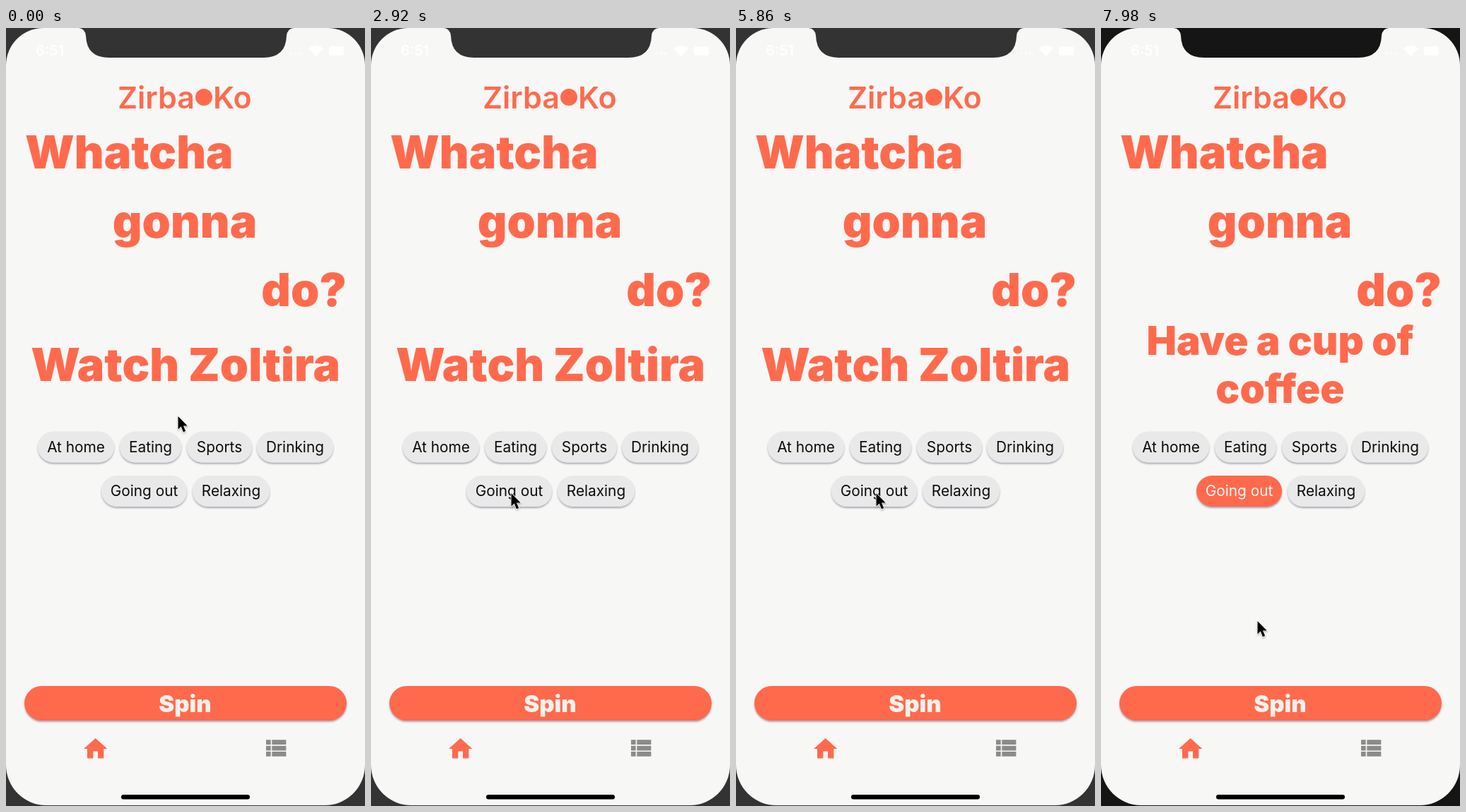
An HTML page that plays this animation: 508 px wide and 1102 px high, repeating every 8000 ms.

```html
<!DOCTYPE html>
<html lang="en">
<head>
<meta charset="utf-8">
<title>Activity picker</title>
<style>
html, body { margin: 0; width: 100%; height: 100%; overflow: hidden; background: #333; }
svg { display: block; width: 508px; height: 1102px; font-family: Inter, "Open Sans", sans-serif; }
.big { font-size: 64.5px; font-weight: 900; fill: #ff6a4d; }
.two { font-size: 56.5px; }
.spin { font-size: 33px; font-weight: 900; fill: #f6f1ec; }
.name { font-size: 43px; font-weight: 600; fill: #ff6a4d; }
.chip { font-size: 20.8px; fill: #0b0b0b; }
.mid { text-anchor: middle; }
</style>
</head>
<body>
<svg viewBox="0 0 508 1102">
  <defs>
    <filter id="shade" x="-10%" y="-20%" width="120%" height="150%">
      <feDropShadow dx="0" dy="2" stdDeviation="1.3" flood-color="#3a3a60" flood-opacity=".42"/>
    </filter>
    <filter id="soft" x="-50%" y="-50%" width="200%" height="200%">
      <feDropShadow dx="0" dy="1.5" stdDeviation="1.2" flood-color="#000" flood-opacity=".3"/>
    </filter>
  </defs>

  <rect class="frame" width="508" height="1102"/>
  <path fill="#f7f7f6" d="M0 53A53 53 0 0 1 53 0H455A53 53 0 0 1 508 53V1044A57 57 0 0 1 451 1101H57A57 57 0 0 1 0 1044Z"/>
  <path class="frame" d="M103 0Q112 1 113 11Q114 42 146 42H364Q396 42 397 11Q398 1 407 0Z"/>

  <g fill="#fff">
    <text x="42" y="39" font-size="20" font-weight="600">6:51</text>
    <circle cx="404" cy="36" r="1.5"/><circle cx="410" cy="36" r="1.5"/><circle cx="416" cy="36" r="1.5"/>
    <path d="M428 29Q438.500 20 449 29L438.500 40Z"/>
    <rect x="457" y="26" width="21" height="13" rx="3"/>
  </g>

  <text class="name" x="158" y="114">Zirba</text>
  <circle cx="280" cy="98" r="12" fill="#ff6a4d"/>
  <text class="name" x="293" y="114">Ko</text>

  <text class="big" x="27" y="199">Whatcha</text>
  <text class="big mid" x="253" y="297">gonna</text>
  <text class="big" x="482" y="394" text-anchor="end">do?</text>
  <text id="before" class="big mid" x="254" y="500">Watch Zoltira</text>
  <g id="after" class="big two mid">
    <text x="253.500" y="463">Have a cup of</text>
    <text x="253.500" y="531">coffee</text>
  </g>

  <g id="chips"></g>

  <rect x="26" y="932" width="456" height="49" rx="24.500" fill="#ff6a4d" filter="url(#shade)"/>
  <text class="spin mid" x="253.500" y="969">Spin</text>

  <path fill="#ff6a4d" transform="translate(106.600 1001) scale(1.67)"
    d="M10 20v-6h4v6h5v-8h3L12 3 2 12h3v8z"/>
  <path fill="#8b8b8b" transform="translate(361.300 1000) scale(1.67)"
    d="M4 14h4v-4H4zM4 19h4v-4H4zM4 9h4V5H4zM9 14h12v-4H9zM9 19h12v-4H9zM9 5v4h12V5z"/>
  <rect x="163" y="1086" width="182" height="6.500" rx="3.250"/>

  <path id="cursor" filter="url(#soft)" stroke="#fff" stroke-width="1.4" paint-order="stroke"
    d="M0 0V18.500L4.200 14.600L7.400 22.300L10.700 20.900L7.500 13.400H13.200Z"/>
</svg>
<script>
const LOOP = 8000, PICK = 6450;
const $ = id => document.getElementById(id);
const frame = document.querySelectorAll('.frame');

function add(parent, tag, attrs) {
  const el = document.createElementNS('http://www.w3.org/2000/svg', tag);
  for (const k in attrs) el.setAttribute(k, attrs[k]);
  return parent.appendChild(el);
}

function chip(label, x, y, width) {
  const box = add($('chips'), 'rect',
    { x, y, width, height: 44, rx: 22, fill: '#e9e9e9', filter: 'url(#shade)' });
  const text = add($('chips'), 'text', { x: x + width / 2, y: y + 29, class: 'chip mid' });
  text.textContent = label;
  return { box, text };
}

chip('At home', 45, 571.5, 108);
chip('Eating', 161, 571.5, 87);
chip('Sports', 256, 571.5, 92);
chip('Drinking', 355, 571.5, 108);
const picked = chip('Going out', 135, 634, 121);
chip('Relaxing', 264, 634, 109);

const ramp = (t, a, b) => Math.min(1, Math.max(0, (t - a) / (b - a)));
const smooth = p => p * p * (3 - 2 * p);
const mix = (a, b, p) => a + (b - a) * p;
const blend = (a, b, p) => a.map((v, i) => mix(v, b[i], p));
const rgb = c => `rgb(${c.map(Math.round)})`;

const GREY = [233, 233, 233], HELD = [236, 119, 96], CORAL = [255, 106, 77];

function cursorAt(t) {
  const go = smooth(ramp(t, 500, 1700));
  const settle = smooth(ramp(t, 1940, 2200));
  const leave = ramp(t, 7250, 7980) ** 2;
  const x = mix(243.5, 200.5, go) - 2 * settle;
  return [mix(x, 221.5, leave), mix(mix(550, 659, go), 840, leave)];
}

function draw(t) {
  const done = t >= PICK;
  frame.forEach(el => el.setAttribute('fill', done ? '#151515' : '#333'));
  $('before').style.display = done ? 'none' : '';
  $('after').style.display = done ? '' : 'none';

  // the press tint fades once the chip is released
  const on = smooth(ramp(t, PICK, PICK + 200));
  const free = smooth(ramp(t, 6860, 7200));
  picked.box.setAttribute('fill', rgb(blend(GREY, blend(HELD, CORAL, free), on)));
  picked.text.style.fill = rgb(blend([11, 11, 11], [255, 250, 248], on));

  $('cursor').setAttribute('transform', `translate(${cursorAt(t)})`);
}

const start = performance.now();
function tick() {
  draw((performance.now() - start) % LOOP);
  requestAnimationFrame(tick);
}
tick();
</script>
</body>
</html>
```
